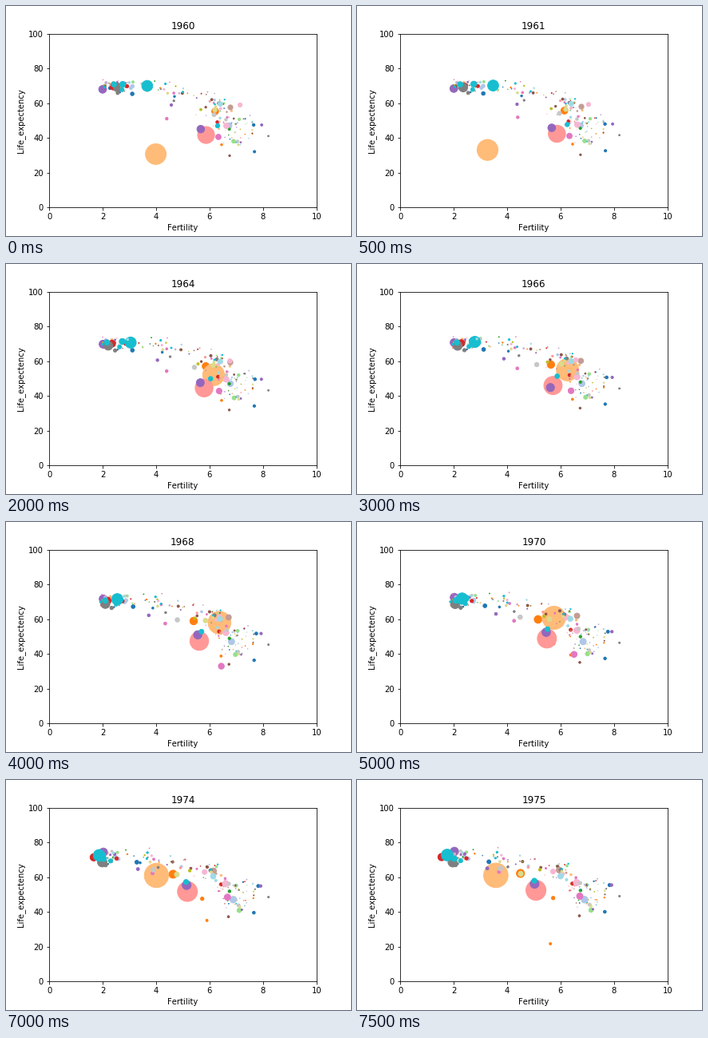
A matplotlib script for the animation above (8000 ms loop, 432 px wide and 288 px high).

```python
import numpy as np
import matplotlib.pyplot as plt
from matplotlib.animation import FuncAnimation

FIRST_YEAR, YEARS = 1960, 16
TAB = plt.get_cmap("tab20").colors
year = np.arange(YEARS)
t = year / (YEARS - 1)
rng = np.random.default_rng(12)
bubbles = []


def dip(centre, depth, width):
    return -depth * np.exp(-((year - centre) / width) ** 2)


def add(color, pop, x, y):
    """Poorer countries grow faster."""
    growth = 0.4 if y.max() < 67 else 0.15
    bubbles.append((color, x, y, pop * (1 + growth * t)))


def glide(color, pop, start, end, ease=1, shock=0):
    """Fertility eases from start to end, life expectancy moves evenly."""
    (x0, y0), (x1, y1) = start, end
    add(color, pop, x0 + (x1 - x0) * t ** ease, y0 + (y1 - y0) * t + shock)


# The largest bubble first swings right, then drifts back
add(3, 667,
    np.interp(year, (0, 1, 2, 3, 4, 8, 10, 15),
              (3.99, 3.27, 5.99, 7.41, 6.15, 6.37, 5.75, 3.58)),
    np.interp(year, (0, 1, 2, 3, 8, 10, 15),
              (30.6, 33, 45, 50.6, 57.9, 60.7, 61)))

# Large bubbles
glide(7, 450, (5.87, 41.6), (5.08, 52.4), 1.8)
glide(18, 186, (3.67, 69.9), (1.76, 72.7), 0.85)
glide(14, 120, (2.56, 69), (1.97, 68.5), 0.4)
glide(8, 93, (2.0, 67.9), (2.03, 74.8), 0.5)
glide(8, 89, (5.67, 45), (5.03, 56.1), 2.8, dip(5.6, 5.5, 1))
glide(2, 73, (6.21, 55.2), (4.5, 62.1), 1.2)
glide(6, 73, (2.4, 69.5), (1.55, 71.5), 2.2)
glide(18, 52, (2.75, 70.8), (1.8, 72.6), 3)
glide(18, 43, (2.42, 70.8), (2.03, 70.6), 0.3)
glide(12, 45, (6.33, 40.5), (6.72, 49), 2, dip(8.6, 14, 1.6))

# Medium bubbles
glide(13, 46, (6.63, 46.9), (6.6, 56.8))
glide(11, 38, (6.78, 57.5), (5.95, 64), 4)
glide(19, 33, (6.4, 59.5), (6.0, 60.5), 6)
glide(18, 28, (6.3, 46.9), (5.02, 57.9), 1.2)
glide(17, 27, (6.2, 56), (4.51, 61.9), 2.5)
glide(13, 26, (7.14, 58.9), (5.72, 63.2))
glide(15, 25, (6.17, 53.3), (3.75, 65), 0.9)
glide(1, 50, (6.73, 47), (6.9, 47))
glide(5, 22, (6.9, 38), (7.14, 41), 2)
glide(0, 20, (3.11, 65.3), (3.32, 68.8), 3)
glide(12, 11, (4.4, 51), (3.7, 63), 4)
glide(8, 10, (4.57, 58.9), (3.26, 65), 0.7)
glide(2, 6, (6.45, 36), (5.62, 41), 6, dip(15, 19.4, 0.9))

# The edge of the cloud rises almost straight up
for color, pop, x, y in ((0, 9, 7.68, 32), (0, 11, 7.65, 47.4),
                         (8, 8, 7.95, 47.4), (10, 5, 6.75, 29.7),
                         (14, 3, 8.2, 41)):
    glide(color, pop, (x, y), (x + rng.uniform(-0.1, 0.2), y + 8))


def low():
    x = rng.uniform(2, 3.2)
    y = np.clip(rng.normal(69.8, 1.9), 64, 73.4)
    return x, y, 0.45 * (1.75 - x) + rng.uniform(-0.15, 0.1), rng.uniform(0.6, 2.6)


def middle():
    x = rng.uniform(3.3, 6.2)
    y = 69.5 - 2 * (x - 3.3) + rng.normal(0, 2.3)
    return x, y, -rng.uniform(0.4, 1.5), rng.uniform(3, 5)


def high():
    y = np.clip(rng.normal(49.5, 7.5), 36, 62)
    x = np.clip(rng.normal(6.65 - 0.025 * (y - 49), 0.48), 5.5, 7.6)
    fall = 0.11 * max(y - 50, 0) * rng.uniform(0.2, 1)
    return x, y, rng.uniform(-0.1, 0.2) - fall, rng.uniform(4, 8)


# Small countries, coloured in order within each crowd
for place, count, smallest, largest in ((low, 32, 0.3, 25),
                                        (middle, 30, 0.1, 9),
                                        (high, 76, 0.08, 14)):
    for i in range(count):
        x, y, dx, dy = place()
        pop = np.exp(rng.uniform(np.log(smallest), np.log(largest)))
        glide(i * 20 // count, pop, (x, y), (x + dx, y + dy),
              rng.uniform(0.8, 1.8))

bubbles.sort(key=lambda b: b[0])
colors = [TAB[b[0]] for b in bubbles]
X, Y, S = (np.array([b[k] for b in bubbles]) for k in (1, 2, 3))

plt.rcParams.update({"font.family": "DejaVu Sans", "font.size": 10,
                     "text.kerning_factor": 6})
fig, ax = plt.subplots(figsize=(6, 4), dpi=72)
fig.subplots_adjust(left=0.125, right=0.9, bottom=0.125, top=0.88)
ax.set(xlim=(0, 10), ylim=(0, 100),
       xlabel="Fertility", ylabel="Life_expectency")
dots = ax.scatter(X[:, 0], Y[:, 0], s=S[:, 0], c=colors)
title = ax.set_title(str(FIRST_YEAR))


def update(i):
    dots.set_offsets(np.column_stack((X[:, i], Y[:, i])))
    dots.set_sizes(S[:, i])
    title.set_text(str(FIRST_YEAR + i))
    return dots, title


anim = FuncAnimation(fig, update, frames=YEARS, interval=500,
                     repeat=True, repeat_delay=0)
plt.show()
```
